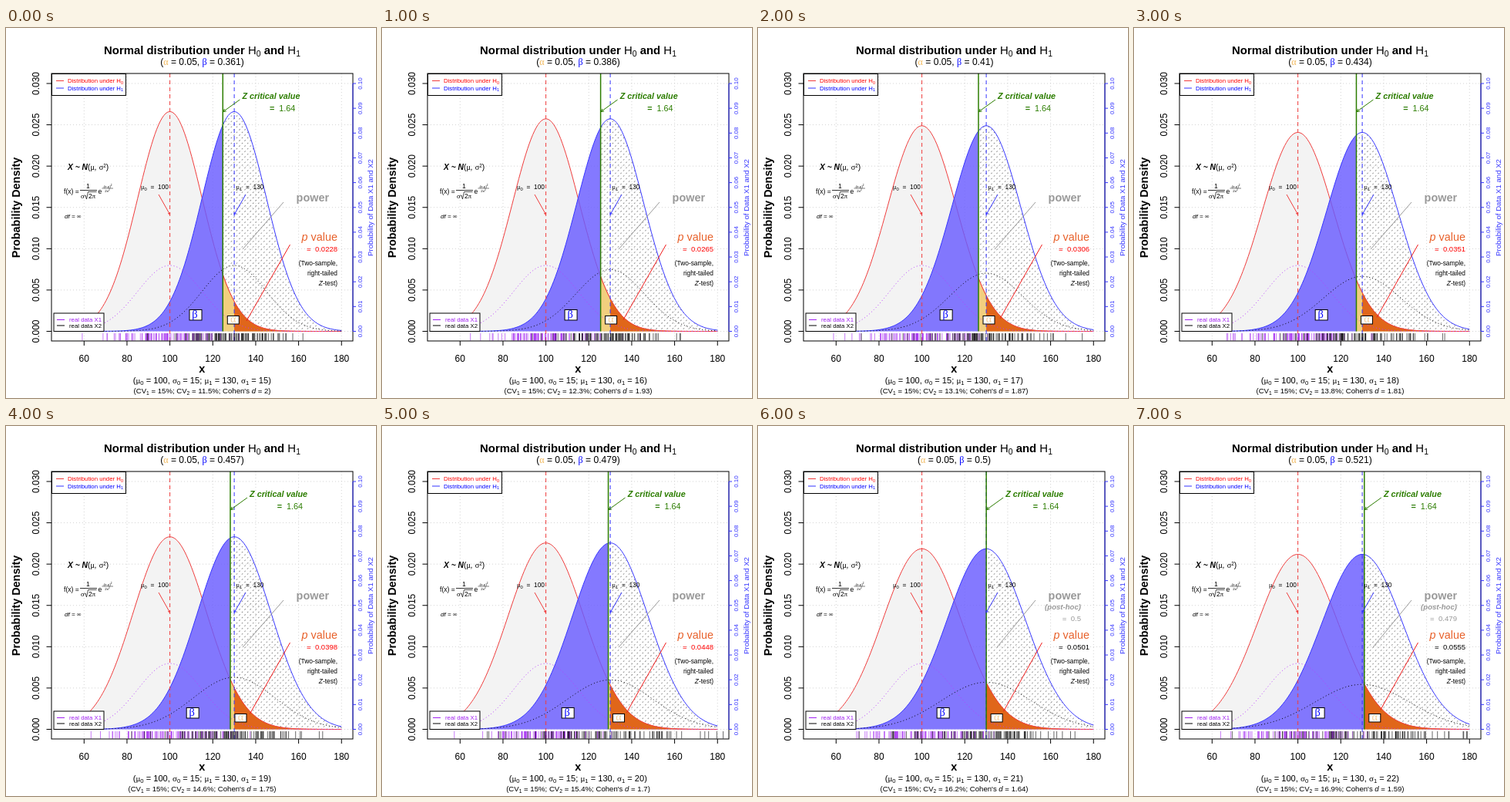
These frames come from a looping animation (480 px wide and 480 px high, 8 s). An HTML page:

```html
<!DOCTYPE html>
<html lang="en">
<head>
<meta charset="utf-8">
<title>Normal distribution under H0 and H1</title>
<style>
html, body { margin: 0; width: 100%; height: 100%; overflow: hidden; background: #fff; }
svg { display: block; width: 480px; height: 480px; }
text { font-family: "Liberation Sans", Arial, sans-serif; white-space: pre; }
.g { font-family: "Liberation Serif", "Times New Roman", serif; font-weight: normal; font-style: normal; }
.b { font-weight: bold; }
.i { font-style: italic; }
.r { font-weight: normal; }
path, line { fill: none; }
</style>
</head>
<body>
<svg id="stage" viewBox="0 0 480 480"></svg>
<script>
const stage = document.getElementById('stage');
const STEP = 1000, STATES = 8;
const M0 = 100, M1 = 130, S0 = 15, Z = 1.64485;
const BASE = 393.5, LEFT = 10717, RIGHT = 3215;
const RED = '#f03c3c', BLUE = '#3535ff', GREEN = '#2c7d00', PURPLE = '#a020f0';
const ORANGE = '#e0661a', GREY = '#999';

const X = v => 101.3 + (v - 60) * 2.783;
const pdf = (x, m, s) => Math.exp(-0.5 * ((x - m) / s) ** 2) / (s * Math.sqrt(2 * Math.PI));

// Normal CDF by Simpson's rule
function cdf(z) {
  const n = 200, h = z / n;
  let sum = pdf(0, 0, 1) + pdf(z, 0, 1);
  for (let i = 1; i < n; i++) sum += pdf(i * h, 0, 1) * (i % 2 ? 4 : 2);
  return 0.5 + sum * h / 3;
}

function rng(seed) {
  return () => {
    seed = (seed + 0x6D2B79F5) | 0;
    let t = Math.imul(seed ^ seed >>> 15, 1 | seed);
    t = t + Math.imul(t ^ t >>> 7, 61 | t) ^ t;
    return ((t ^ t >>> 14) >>> 0) / 4294967296;
  };
}

const line = (x1, y1, x2, y2, c, w = 1, extra = '') =>
  `<line x1="${x1}" y1="${y1}" x2="${x2}" y2="${y2}" stroke="${c}" stroke-width="${w}" ${extra}/>`;
const box = (x, y, w, h, fill = '#fff') =>
  `<rect x="${x}" y="${y}" width="${w}" height="${h}" fill="${fill}" stroke="#000"/>`;
const text = (x, y, size, str, o = {}) =>
  `<text x="${x}" y="${y}" font-size="${size}" fill="${o.c || '#000'}" class="${o.k || ''}"
    text-anchor="${o.a || 'start'}" ${o.turn ? `transform="rotate(-90 ${x} ${y})"` : ''}>${str}</text>`;
const greek = (s, c) => `<tspan class="g"${c ? ` fill="${c}"` : ''}>${s}</tspan>`;
const shift = (s, dy, size) =>
  `<tspan dy="${dy}" font-size="${size}">${s}</tspan><tspan dy="${-dy}">\u200b</tspan>`;
const sub = (s, size) => shift(s, size * 0.22, size * 0.7);
const sup = (s, size) => shift(s, -size * 0.38, size * 0.7);

function curve(m, s, scale, from = 50, to = 180) {
  const pts = [];
  for (let i = 0; i <= 160; i++) {
    const v = from + (to - from) * i / 160;
    pts.push(X(v).toFixed(2) + ' ' + (BASE - pdf(v, m, s) * scale).toFixed(2));
  }
  return 'M' + pts.join('L');
}
const stroke = (d, c, extra = '') => `<path d="${d}" stroke="${c}" ${extra}/>`;
const area = (m, s, from, to, fill, extra = '') =>
  `<path d="${curve(m, s, LEFT, from, to)}L${X(to)} ${BASE}L${X(from)} ${BASE}Z" style="fill:${fill}" ${extra}/>`;

function arrow(x1, y1, x2, y2, c, head = 4) {
  const a = Math.atan2(y2 - y1, x2 - x1);
  const wing = d => `${x2 - head * Math.cos(a + d)} ${y2 - head * Math.sin(a + d)}`;
  return line(x1, y1, x2, y2, c) + stroke(`M${wing(0.5)}L${x2} ${y2}L${wing(-0.5)}`, c);
}

function rug(mean, sd, c, rand) {
  let d = '';
  for (let i = 0; i < 100; i++) {
    const n = Math.sqrt(-2 * Math.log(1 - rand())) * Math.cos(2 * Math.PI * rand());
    const x = X(mean + sd * n);
    if (x > 60 && x < 449) d += `M${x.toFixed(1)} 396V405.5`;
  }
  return stroke(d, c, 'stroke-width=".6"');
}

function grid() {
  let d = '';
  for (let v = 60; v <= 180; v += 20) d += `M${X(v)} 59V406`;
  for (let i = 0; i <= 6; i++) d += `M59 ${BASE - i * 0.005 * LEFT}H450`;
  return stroke(d, '#d3d3d3', 'stroke-dasharray="1 3"');
}

function axes() {
  let out = '<rect x="59" y="59" width="391" height="347" fill="none" stroke="#000"/>';
  for (let v = 60; v <= 180; v += 20)
    out += line(X(v), 406, X(v), 412, '#000') + text(X(v), 432.5, 12, v, { a: 'middle' });
  for (let i = 0; i <= 6; i++) {
    const y = BASE - i * 0.005 * LEFT;
    out += line(52.5, y, 59, y, '#000') +
      text(43, y, 12, (i * 0.005).toFixed(3), { a: 'middle', turn: 1 });
  }
  out += line(450, 72, 450, BASE, BLUE);
  for (let i = 0; i <= 10; i++) {
    const y = BASE - i * 0.01 * RIGHT;
    out += line(450, y, 454, y, BLUE) +
      text(462, y, 8, (i * 0.01).toFixed(2), { a: 'middle', turn: 1, c: BLUE });
  }
  return out +
    text(18, 233, 14.4, 'Probability Density', { k: 'b', a: 'middle', turn: 1 }) +
    text(475.5, 233, 9.6, 'Probability of Data X1 and X2', { a: 'middle', turn: 1, c: BLUE }) +
    text(254.3, 446.5, 14.4, 'x', { k: 'b', a: 'middle' });
}

function legends() {
  return box(59.5, 59.5, 96, 28) +
    line(65, 68.5, 75, 68.5, RED) + line(65, 78, 75, 78, BLUE) +
    text(80, 71, 7.8, 'Distribution under H' + sub(0, 7.8), { c: '#f00' }) +
    text(80, 80.5, 7.8, 'Distribution under H' + sub(1, 7.8), { c: '#00f' }) +
    box(62, 370, 65, 23.5) +
    line(66, 378.5, 76, 378.5, PURPLE) + line(66, 386, 76, 386, '#000') +
    text(82, 381, 7.8, 'real data X1', { c: PURPLE }) +
    text(82, 388.5, 7.8, 'real data X2');
}

function formulas() {
  return text(80, 184, 10.3, `X ~ N<tspan class="r" font-style="normal">(</tspan>${greek('μ')}<tspan class="r">, </tspan>` +
      `${greek('σ')}<tspan class="r" font-style="normal">${sup(2, 9)})</tspan>`, { k: 'b i' }) +
    text(75, 215, 8.6, 'f(x) =') +
    text(106.5, 207.5, 8.6, '1', { a: 'middle' }) +
    line(96, 210.5, 118, 210.5, '#000', 0.8) +
    text(97, 221, 8.6, greek('σ')) + text(107, 221, 8.6, '2' + greek('π')) +
    stroke('M101.5 218L103 217L104.5 222L106.5 212.5H117.5', '#000', 'stroke-width=".7"') +
    text(119.5, 215, 8.6, 'e') +
    text(131.5, 206.5, 4.4, `-(x-${greek('μ')})${sup(2, 4.4)}`, { a: 'middle' }) +
    line(124.5, 208, 139, 208, '#000', 0.5) +
    text(131.5, 212.5, 4.4, `2${greek('σ')}${sup(2, 4.4)}`, { a: 'middle' }) +
    text(76, 247, 8, `df = ${greek('∞')}`, { k: 'i' });
}

function draw(k) {
  const s1 = 15 + k, sd = Math.sqrt((S0 * S0 + s1 * s1) / 2);
  const d = (M1 - M0) / sd, crit = M0 + Z * sd, cx = X(crit);
  const beta = cdf(Z - d), p = 1 - cdf(d), post = p > 0.05;
  const num = (v, n) => String(+v.toFixed(n));
  const grow = sd - 15, x0 = X(M0), x1 = X(M1), rand = rng(41 + k * 97);
  const bx = 246 - 1.8 * grow, ax = cx + 13.5;
  const dash = 'stroke-dasharray="5 4"', dots = 'stroke-dasharray="1 3"';

  stage.innerHTML = `<defs><pattern id="hatch" width="5" height="5" patternUnits="userSpaceOnUse"
      patternTransform="rotate(-45)"><path d="M0 2.5H2" stroke="#888" stroke-width=".9"/></pattern></defs>
    <rect width="480" height="480" fill="#fff"/>` +
    grid() +
    area(M0, sd, 50, 180, '#f3f3f3') +
    stroke(curve(M0, sd, LEFT), RED) +
    area(M1, sd, 50, crit, '#6a5cff', 'fill-opacity=".82"') +
    area(M1, sd, crit, 180, 'url(#hatch)') +
    area(M0, sd, crit, 180, '#f2cf7e') +
    area(M0, sd, Math.max(crit, M1), 180, ORANGE) +
    stroke(curve(M0, sd, LEFT, crit, 180), RED) +
    stroke(curve(M1, sd, LEFT), BLUE) +
    stroke(curve(M0, S0, RIGHT), '#b93cff', dots) +
    stroke(curve(M1, s1, RIGHT), '#000', dots) +
    line(x0, 59, x0, 406, RED, 1, dash) +
    line(x1, 59, x1, 406, BLUE, 1, dash) +
    line(cx, 59, cx, BASE, GREEN, 1.5) +
    rug(M0, S0, PURPLE, rand) + rug(M1, s1, '#000', rand) +
    axes() + legends() + formulas() +

    text(254.5, 34, 14.9, `Normal distribution under <tspan class="r">H${sub(0, 14.9)}</tspan> and <tspan class="r">H${sub(1, 14.9)}</tspan>`,
      { k: 'b', a: 'middle' }) +
    text(254.5, 48, 12.1, `(${greek('α', '#f2b95c')} = 0.05, ${greek('β', '#00f')} = ${num(beta, 3)})`, { a: 'middle' }) +
    text(254.3, 460.5, 11.1, `(${greek('μ')}${sub(0, 11)} = 100, ${greek('σ')}${sub(0, 11)} = 15; ` +
      `${greek('μ')}${sub(1, 11)} = 130, ${greek('σ')}${sub(1, 11)} = ${s1})`, { a: 'middle' }) +
    text(254.5, 474, 9.6, `(CV${sub(1, 9.6)} = 15%; CV${sub(2, 9.6)} = ${num(s1 / M1 * 100, 1)}%; ` +
      `Cohen's <tspan class="i">d</tspan> = ${num(d, 2)})`, { a: 'middle' }) +

    text(175, 209, 8.4, `${greek('μ')}${sub(0, 8.4)}  =  100`) +
    arrow(198, 216, x0, 242, RED, 3) +
    text(298.5, 209, 8.4, `${greek('μ')}${sub(1, 8.4)}  =  130`) +
    arrow(311, 216, x1, 242, BLUE, 3) +

    text(cx + 62.6, 92, 10.8, 'Z critical value', { k: 'b i', c: GREEN, a: 'middle' }) +
    text(cx + 94, 107.5, 10.8, '<tspan class="b">=</tspan>  1.64', { c: GREEN, a: 'end' }) +
    arrow(cx + 22, 93, cx + 0.5, 108.5, GREEN) +

    line(360, 226, 307 + (post ? 3 : 0), 287, GREY) +
    text(419, 225, 14.4, 'power', { k: 'b', c: GREY, a: 'end' }) +
    (post ? text(419, 238, 9.6, '(post-hoc)', { k: 'b i', c: GREY, a: 'end' }) +
      text(419, 252.5, 9.6, `=  ${num(1 - beta, 3)}`, { c: GREY, a: 'end' }) : '') +
    line(368.5, 281, 312 + 2 * grow, 380 - 3 * grow, '#f01818') +
    text(430, 276, 14.4, '<tspan class="i">p</tspan> value', { c: '#e8622c', a: 'end' }) +
    text(430, 290, 9.5, `=  ${num(p, 4)}`, { c: post ? '#000' : '#f00', a: 'end' }) +
    text(430, 308, 8.4, '(Two-sample,', { a: 'end' }) +
    text(430, 321, 8.4, 'right-tailed', { a: 'end' }) +
    text(430, 333.5, 8.4, '<tspan class="i">Z</tspan>-test)', { a: 'end' }) +

    box(bx - 8, 365.5, 16, 13.5) +
    text(bx - 1, 376, 14.4, greek('β'), { c: '#00f', a: 'middle' }) +
    box(ax - 7.5, 373.5, 15, 10.5) +
    text(ax, 382, 14.4, greek('α'), { c: '#f3cf9a', a: 'middle' });
}

let shown = -1;
function tick() {
  const k = Math.floor(performance.now() / STEP) % STATES;
  if (k !== shown) draw(shown = k);
  requestAnimationFrame(tick);
}
tick();
</script>
</body>
</html>
```
